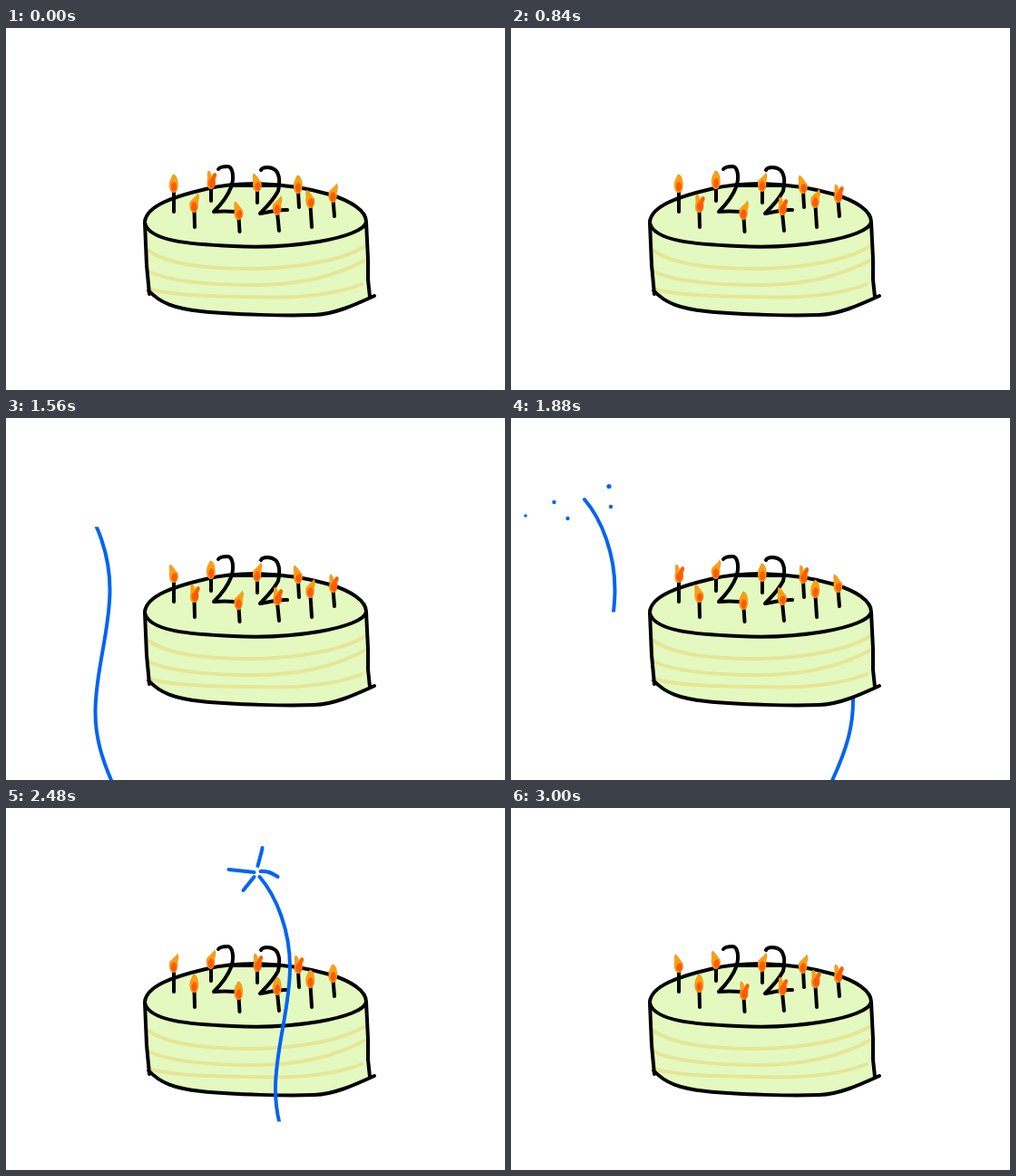
An HTML page with a canvas that plays this animation: 550x400 px, repeating every 3.04 s.

```html
<!DOCTYPE html>
<html>
<head>
<meta charset="utf-8">
<style>
html, body { margin: 0; width: 100%; height: 100%; overflow: hidden; background: #fff; }
canvas { display: block; }
</style>
</head>
<body>
<canvas id="stage" width="550" height="400"></canvas>
<script>
const ctx = document.getElementById('stage').getContext('2d');
const FRAME = 40, FRAMES = 76, FLICKER = 17;
const BLUE = '#0264f4';
const shape = d => new Path2D(d);

const rim = 'M153 214C155 196 186 186 220 178C240 173 260 172 276 172C310 173 340 179 357 184C380 191 397 202 397 214';
const base = 'M157 290C170 304 186 310 215 313C250 317 312 318 340 317C362 316 382 307 406 296';
const body = shape(rim + 'L399 255L399 278L401 298C382 307 362 316 340 317C312 318 250 317 215 313C186 310 170 304 157 290Z');
const layers = shape('M157 246C180 262 222 266 275 266C325 265 372 256 396 241M157 269C180 280 225 284 275 284C325 284 366 273 397 256M160 289C190 296 225 296 270 297C320 299 362 295 392 283');
const outline = shape(rim + 'C396 223 374 231 345 236C315 241 285 243 250 241C205 239 157 236 153 215L155 262L158 294M397 214L399 255L399 278L401 297M250 174L304 174' + base);
const digits = shape('M234 156Q236 153 244 153C250 153 252 165 248 176C244 187 236 196 229 203Q240 202 253 203M281 157C283 153 292 153 297 157C302 162 302 172 300 180C295 190 287 198 280 205C290 204 298 200 310 201');

// Flame base, stick end, and the flicker step where the upright pose begins
const candles = [
  [185, 182, 185, 203, 0], [207.5, 204, 208, 220, 7], [226, 178, 226, 191, 1],
  [256.5, 212, 257.5, 225, 11], [277, 181, 277, 193, 12], [299, 207, 301, 224, 8],
  [322, 183, 323, 198, 14], [335.5, 199, 337, 220, 11], [360.5, 193, 362, 208, 8]
];

// Outer and inner flame: upright, left, right, split
const poses = [
  ['M-1 -20C3 -21 5 -13 4.5 -7C4 -2 2 0 0 0C-4 0 -5 -5 -5 -9C-5 -13 -3 -16 -1 -20Z',
   'M0 -12C4 -12 4 -2 0 -1C-4 -2 -4 -10 0 -12Z'],
  ['M-4 -20C-1 -19 1 -14 4 -11C6 -7 4 0 0 0C-4 0 -5 -5 -5 -9C-4 -13 -6 -18 -4 -20Z',
   'M1 -11C5 -10 4 -2 1 -1C-4 -2 -4 -9 1 -11Z'],
  ['M4 -21C6 -19 5 -14 4 -11C5 -6 3 0 0 0C-4 0 -5 -5 -5 -9C-5 -14 0 -15 4 -21Z',
   'M0 -12C4 -11 4 -2 0 -1C-5 -2 -4 -10 0 -12Z'],
  ['M-3 -20C0 -20 0 -16 1 -14C2 -18 5 -19 6 -16C6 -12 4 -11 4.5 -8C5 -3 3 0 0 0C-4 0 -5 -5 -4 -10C-3 -13 -5 -18 -3 -20Z',
   'M0 -12L3 -17Q6 -19 6 -15L4 -11C6 -7 4 -2 1 -1C-4 -2 -4 -9 0 -12Z']
].map(p => p.map(shape));

const trail = shape('M124 418C104 376 98 350 98.5 322C99 278 114.5 235 114.5 190C114.5 150 100 112 81 90');
// Sparks relative to the burst centre
const rays = [
  shape('M-32 -4L-4 -1'), shape('M5 -28L4 -23L0 -8'),
  shape('M3 -2Q12 -3 22 4'), shape('M-16 19L-4 4')
];
const drift = [[-25, 0], [5, -23], [17, 4], [-14, 16]];
const sparks = [[-63, 22, 1.8], [-31.5, 7, 2.2], [-16.5, 25, 2.2], [29, -10.5, 2.6], [31, 12, 2.2]];
const rockets = [
  { start: 30, speed: 29.2, x: 0, y: 0, flip: 1 },
  { start: 41, speed: 30, x: 475.5, y: -12, flip: -1 },
  { start: 50, speed: 29.2, x: 198.5, y: -14, flip: 1 }
];

function stroke(path, color, width) {
  ctx.strokeStyle = color;
  ctx.lineWidth = width;
  ctx.stroke(path);
}

function drawBurst(step) {
  ctx.translate(79, 86);
  if (step < 14) {
    rays.forEach((ray, i) => {
      ctx.save();
      if (step === 11) ctx.scale(0.5, 0.5);
      if (step === 13) ctx.translate(...drift[i]);
      stroke(ray, BLUE, step === 11 ? 8 : 4);
      ctx.restore();
    });
    return;
  }
  const spread = Math.min(1, 0.85 + 0.05 * (step - 14));
  ctx.fillStyle = BLUE;
  for (const [x, y, r] of sparks) {
    ctx.beginPath();
    ctx.arc(x * spread, y * spread, r, 0, 7);
    ctx.fill();
  }
}

function drawRocket({ start, speed, x, y, flip }, frame) {
  const step = frame - start;
  if (step < 0 || step > 21) return;
  ctx.save();
  ctx.translate(x, y);
  ctx.scale(flip, 1);
  // A window rising over the trail reveals it, then wipes it away
  ctx.save();
  ctx.beginPath();
  ctx.rect(0, 383 - speed * step, 200, 328);
  ctx.clip();
  stroke(trail, BLUE, 4);
  ctx.restore();
  if (step > 10 && step < 20) drawBurst(step);
  ctx.restore();
}

function drawCandle([x, y, endX, endY, upright], frame) {
  ctx.beginPath();
  ctx.moveTo(x, y - 3);
  ctx.lineTo(endX, endY);
  ctx.strokeStyle = '#000';
  ctx.lineWidth = 4;
  ctx.stroke();
  const phase = (frame - upright + FLICKER) % FLICKER;
  const pose = phase < 5 ? 0 : Math.floor((phase - 1) / 4);
  const [outer, inner] = poses[pose];
  ctx.save();
  ctx.translate(x, y);
  ctx.fillStyle = '#ff9f0c';
  ctx.fill(outer);
  stroke(outer, 'rgba(130,100,70,.4)', 0.5);
  ctx.fillStyle = '#ff5a08';
  ctx.fill(inner);
  ctx.restore();
}

function draw(now) {
  const frame = Math.floor(now / FRAME) % FRAMES;
  ctx.fillStyle = '#fff';
  ctx.fillRect(0, 0, 550, 400);
  ctx.lineCap = ctx.lineJoin = 'round';
  drawRocket(rockets[0], frame);
  drawRocket(rockets[1], frame);
  ctx.fillStyle = '#e4f9c0';
  ctx.fill(body);
  stroke(layers, '#e6e696', 4);
  stroke(outline, '#000', 4);
  stroke(digits, '#000', 4);
  for (const candle of candles) drawCandle(candle, frame % FLICKER);
  drawRocket(rockets[2], frame);
}

const begin = performance.now();
function tick() {
  draw(performance.now() - begin);
  requestAnimationFrame(tick);
}
tick();
</script>
</body>
</html>
```
